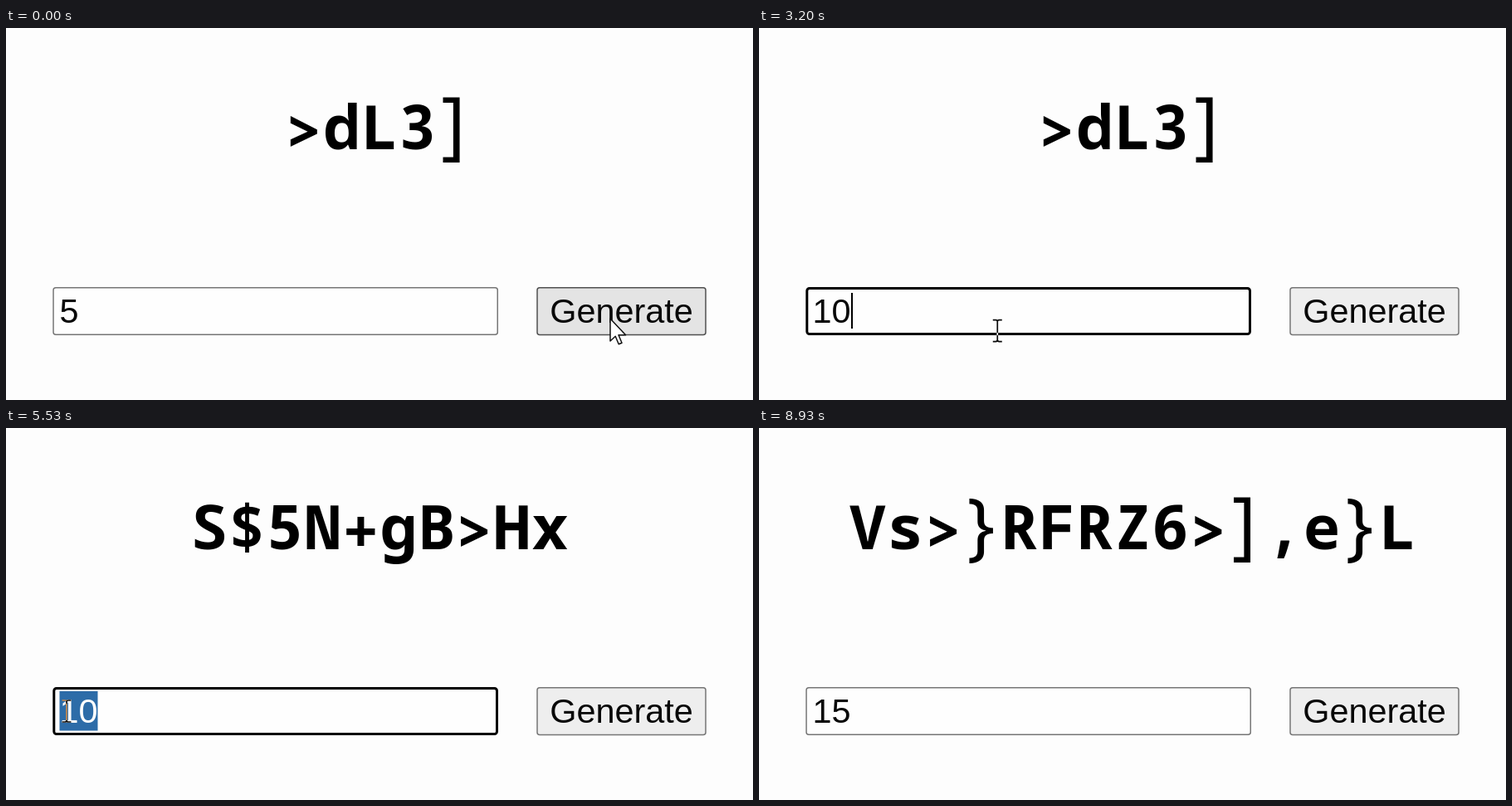
Write an HTML page that moves like this. It is 900 by 448 pixels and loops after 8990 ms.

```html
<!DOCTYPE html>
<html lang="en">
<head>
<meta charset="utf-8">
<title>Password generator</title>
<style>
  html, body { margin: 0; width: 100%; height: 100%; overflow: hidden; background: #fdfdfd; }
  svg { display: block; width: 100%; height: 100%; }
  #password { font: 600 74.4px "Noto Sans Mono", monospace; text-anchor: middle; }
  #password .bracket { font-size: 89px; font-weight: 500; }
  .ui { font: 41.4px "Liberation Sans", Arial, sans-serif; fill: #080808; }
  #beam { fill: none; stroke: #f4f4f4; stroke-width: 1.7; mix-blend-mode: difference; }
</style>
</head>
<body>
<svg viewBox="0 0 900 448">
  <rect width="900" height="448" fill="#fdfdfd"/>
  <g id="password"></g>

  <rect id="field" rx="3" fill="#fefefe"/>
  <rect id="selection" x="64.5" y="317" height="47.5" fill="#2d6ca8"/>
  <text id="value" class="ui" x="64.5" y="355.4"></text>
  <path id="caret" stroke="#000" stroke-width="2"/>

  <rect id="button" x="640" y="312.7" width="203" height="56.8" rx="3" stroke-width="1.5"/>
  <text class="ui" x="741.5" y="355.4" text-anchor="middle">Generate</text>

  <path id="arrow" d="M0 0V27L6.2 21.3L10.2 30.8L14 29.2L10 19.8H18.6Z"
        fill="#fefefe" stroke="#111" stroke-width="1.5" stroke-linejoin="round"/>
  <path id="beam" d="M-5.5-13H-2Q0-13 0-11Q0-13 2-13H5.5M0-11V11M-5.5 13H-2Q0 13 0 11Q0 13 2 13H5.5"/>
</svg>
<script>
const LOOP = 8990, STEP = LOOP / 135;
const PITCH = 45.6, DIGIT = 23, KEY_GAP = 130, CLICK = 180;
const $ = id => document.getElementById(id);

// Each round: go to the field, select the number, type a new one, press the button
const initial = { size: "5", result: ">dL3]" };
const rounds = [
  { start: 90, focus: 890, type: 2650, press: 3800, size: "10", result: "S$5N+gB>Hx", x: 772, y: 343, dip: 28 },
  { start: 4190, focus: 4950, type: 5600, press: 6390, size: "15", result: "Vs>}RFRZ6>],e}L", x: 748, y: 345, dip: 6 }
];

const sweep = (start, end, x, y, dip = 0) => ({ start, end, x, y, dip });
const sweeps = [
  ...rounds.flatMap(r => [
    sweep(r.start, r.focus, 128, 343),
    sweep(r.focus + 100, r.focus + 450, 73, 341),
    sweep(r.type + 230, r.press - 60, r.x, r.y, r.dip)
  ]),
  sweep(6650, 7520, 250, 367, 75),
  sweep(7600, 7800, 205, 480)
];

const ease = u => u * u * (3 - 2 * u);

function pointer(t) {
  let x = 728, y = 350;
  for (const s of sweeps) {
    if (t < s.start) break;
    const e = ease(Math.min(1, (t - s.start) / (s.end - s.start)));
    x += (s.x - x) * e;
    y += (s.y - y) * e + s.dip * Math.sin(Math.PI * e);
  }
  return [x, y];
}

const within = (x, y, left, right) => x >= left && x <= right && y >= 312 && y <= 370;

function set(id, attrs) {
  for (const name in attrs) $(id).setAttribute(name, attrs[name]);
}

function show(id, visible) {
  $(id).style.display = visible ? "" : "none";
}

// One centred glyph per cell; operators sit lower, brackets are taller
function drawPassword(text) {
  if ($("password").textContent === text) return;
  $("password").replaceChildren(...[...text].map((char, i) => {
    const glyph = document.createElementNS("http://www.w3.org/2000/svg", "text");
    const bracket = /[\]}]/.test(char), operator = /[>+]/.test(char);
    glyph.textContent = char;
    glyph.setAttribute("x", 450 + (i - (text.length - 1) / 2) * PITCH);
    glyph.setAttribute("y", bracket ? 148.5 : operator ? 151 : 146);
    if (bracket) glyph.setAttribute("class", "bracket");
    return glyph;
  }));
}

function drawField(t, round, before, x, hover) {
  const focused = t >= round.focus && t < round.press;
  const typed = t >= round.type;
  const text = typed ? round.size.slice(0, t < round.type + KEY_GAP ? 1 : 2) : before.size;
  const w = focused ? 3 : 1.5;
  set("field", {
    x: 56.3 + w / 2, y: 312 + w / 2, width: 536.7 - w, height: 58 - w,
    "stroke-width": w, stroke: focused ? "#000" : hover ? "#484848" : "#767676"
  });

  // Dragging left selects every digit whose centre lies right of the pointer
  const first = Math.max(0, Math.round((x - 65) / DIGIT));
  const count = focused && !typed ? Math.max(0, text.length - first) : 0;
  const left = 64.5 + (text.length - count) * DIGIT;
  set("selection", { x: left, width: count * DIGIT });
  show("selection", count);
  $("value").textContent = text;
  $("value").style.fill = count ? "#fefefe" : "";
  set("caret", { d: `M${66 + text.length * DIGIT} 319V362` });
  show("caret", focused && !count && t % 1060 < 700);
}

function drawButton(pressed, hover) {
  set("button", {
    fill: pressed ? "#f5f5f5" : hover ? "#e4e4e4" : "#eeeeee",
    stroke: pressed ? "#8d8d8d" : hover ? "#505050" : "#767676"
  });
}

function draw(time) {
  const t = Math.floor(time % LOOP / STEP + 0.05) * STEP;
  const i = t < rounds[1].start ? 0 : 1;
  const round = rounds[i], before = rounds[i - 1] || initial;
  const released = t >= round.press + CLICK;
  const [x, y] = pointer(t);
  const overField = within(x, y, 56, 593), overButton = within(x, y, 639, 844);

  drawPassword((released ? round : before).result);
  drawField(t, round, before, x, overField);
  drawButton(t >= round.press && !released, overButton);
  for (const id of ["arrow", "beam"]) set(id, { transform: `translate(${x} ${y})` });
  show("arrow", !overField);
  show("beam", overField);
}

const start = performance.now();
function tick() {
  draw(performance.now() - start);
  requestAnimationFrame(tick);
}
tick();
</script>
</body>
</html>
```
